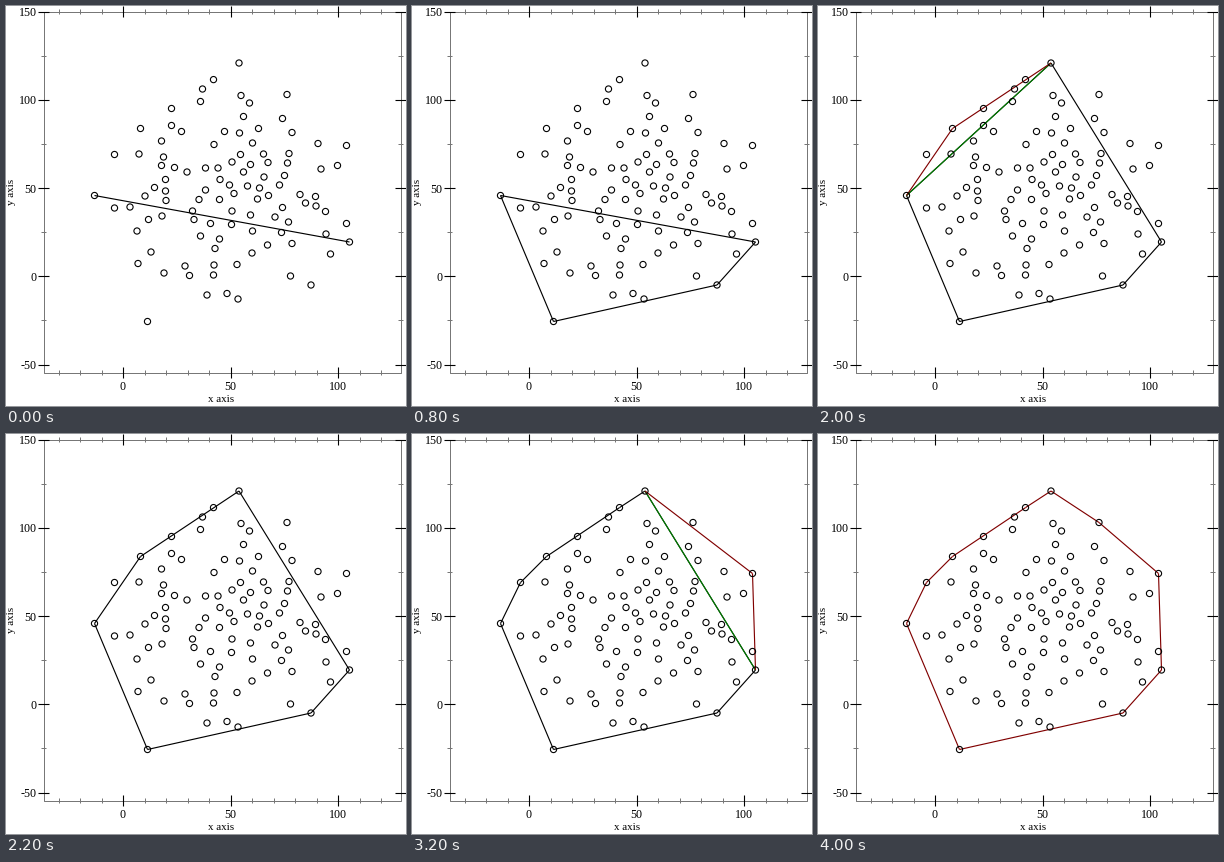
Write a matplotlib script that moves like this. It is 400 px wide and 400 px high and loops after 6000 ms.

```python
import matplotlib.pyplot as plt
from matplotlib.animation import FuncAnimation
from matplotlib.collections import LineCollection

SIZE, DPI = 400, 100
PX = 72 / DPI  # points per pixel
FRAME_MS, FRAMES = 200, 30
RED, GREEN, GREY = "#800000", "#008000", "#777777"

# Stage coordinates, y pointing down.
LEFTMOST, RIGHTMOST = (88.5, 189.5), (343.5, 236)
ABOVE = [
    (233, 57), (207.5, 73.6), (196.5, 83), (281, 88.5), (235, 89.5),
    (194.5, 95.5), (243.5, 97), (165.5, 102.5), (237.5, 110.5),
    (276.5, 112.5), (165.5, 119.5), (134.5, 122.5), (175.5, 125.5),
    (218.5, 125.5), (252.5, 122.5), (233.5, 127), (286, 126.5),
    (155.5, 135), (208, 138.5), (246.5, 137), (312, 137.5),
    (340.5, 139.5), (108.5, 148.5), (133, 148), (157.5, 151),
    (234.5, 148.5), (257.5, 148), (283, 147.5), (155.5, 159.5),
    (168.5, 161.5), (226, 156), (244.5, 158.5), (262, 156.5),
    (281.5, 157), (181, 166), (199.5, 162), (212, 162), (237.5, 166),
    (315, 163), (331.5, 159.5), (159.5, 173.5), (214, 173.5),
    (258, 171), (278.5, 169.5), (148.5, 181.5), (159.5, 185),
    (199.5, 184), (223.5, 179), (241.5, 180), (253.5, 182),
    (273.5, 179), (139, 190), (160, 194.5), (193, 193.5),
    (213.5, 193.5), (228, 187.5), (251.5, 193), (262.5, 189.5),
    (294, 188.5), (309.5, 190.5), (299.5, 197), (310, 200),
    (276.5, 201.5), (319.5, 205.5), (186.5, 205), (226, 205),
    (244.5, 209), (269, 211), (282.5, 216), (340.5, 217.5), (320, 228),
]
BELOW = [
    (108.5, 202), (124, 201), (131, 225), (142.5, 213.5), (156, 210),
    (188, 213.5), (204.5, 217.5), (225.5, 218.5), (194.5, 230),
    (213.5, 233), (246.5, 225), (275.5, 226.5), (261.5, 239),
    (286, 237.5), (324.5, 248), (145, 246), (209, 242.5), (246, 247),
    (132, 257.5), (158, 267), (179, 260), (183.5, 269.5), (208, 259),
    (207.5, 269), (231, 258.5), (284.5, 270), (305, 279), (201, 289),
    (221, 287.5), (232, 293), (141.5, 315.5),
]


def cross(a, b, p):
    return (b[0] - a[0]) * (p[1] - a[1]) - (b[1] - a[1]) * (p[0] - a[0])


def expand(a, b, points, side, edges, steps):
    """Quickhull on one edge, recording each split as two steps."""
    outside = [p for p in points if side * cross(a, b, p) > 0]
    if not outside:
        return
    far = max(outside, key=lambda p: side * cross(a, b, p))
    new = [(a, far), (far, b)]
    steps.append((list(edges), [(a, b)], new))
    edges.remove((a, b))
    edges.extend(new)
    steps.append((list(edges), [], []))
    for start, end in new:
        expand(start, end, outside, side, edges, steps)


def build_steps():
    base = (LEFTMOST, RIGHTMOST)
    edges = [base, base]  # one copy for each half
    steps = [([base], [], [])]
    expand(*base, BELOW, 1, edges, steps)
    steps += [steps[-1]] * 3
    expand(*base, ABOVE, -1, edges, steps)
    steps += [([], [], list(edges))] * (FRAMES - len(steps))
    return steps


def line(x, y, color, width):
    ax.plot(x, y, color=color, lw=width * PX, solid_capstyle="butt")


def label(x, y, text, size, **style):
    ax.text(x, y, text, fontsize=size * PX, family="Liberation Serif",
            va="center_baseline", **style)


def draw_axes():
    left, right, top, bottom = 37.5, 394.5, 5.5, 366.5
    line([left, right, right, left, left],
         [top, top, bottom, bottom, top], GREY, 1)
    for value in range(-30, 130, 10):
        x = 117 + 2.15 * value
        major = value in (0, 50, 100)
        reach = 5.5 if major else 2.5
        for y in (top, bottom):
            line([x, x], [y - reach, y + reach],
                 "black" if major else GREY, 1.1 if major else 1)
        if major:
            label(x, 380, str(value), 12, ha="center")
    for value in range(-50, 151, 25):
        y = 270.3 - 1.765 * value
        major = value % 50 == 0
        reach = 5.5 if major else 2.5
        for x in (left, right):
            line([x - reach, x + reach], [y, y],
                 "black" if major else GREY, 1.1 if major else 1)
        if major:
            label(30.5, y, str(value), 12, ha="right")
    label(215.5, 393, "x axis", 11, ha="center")
    ax.text(6, 186, "y axis", fontsize=11 * PX, family="Liberation Serif",
            rotation=90, ha="center", va="center")


fig = plt.figure(figsize=(SIZE / DPI, SIZE / DPI), dpi=DPI, facecolor="white")
ax = fig.add_axes([0, 0, 1, 1])
ax.axis("off")
draw_axes()
ax.scatter(*zip(LEFTMOST, RIGHTMOST, *ABOVE, *BELOW), s=(6.2 * PX) ** 2,
           facecolors="none", edgecolors="black", linewidths=1.1 * PX, zorder=4)
layers = [ax.add_collection(LineCollection([], colors=color, zorder=3,
                                           linewidths=1.15 * PX))
          for color in ("black", GREEN, RED)]
ax.set_xlim(0, SIZE)
ax.set_ylim(SIZE, 0)
steps = build_steps()


def update(frame):
    for layer, segments in zip(layers, steps[frame]):
        layer.set_segments(segments)
    return layers


animation = FuncAnimation(fig, update, frames=FRAMES, interval=FRAME_MS,
                          repeat=True, repeat_delay=0)
plt.show()
```
